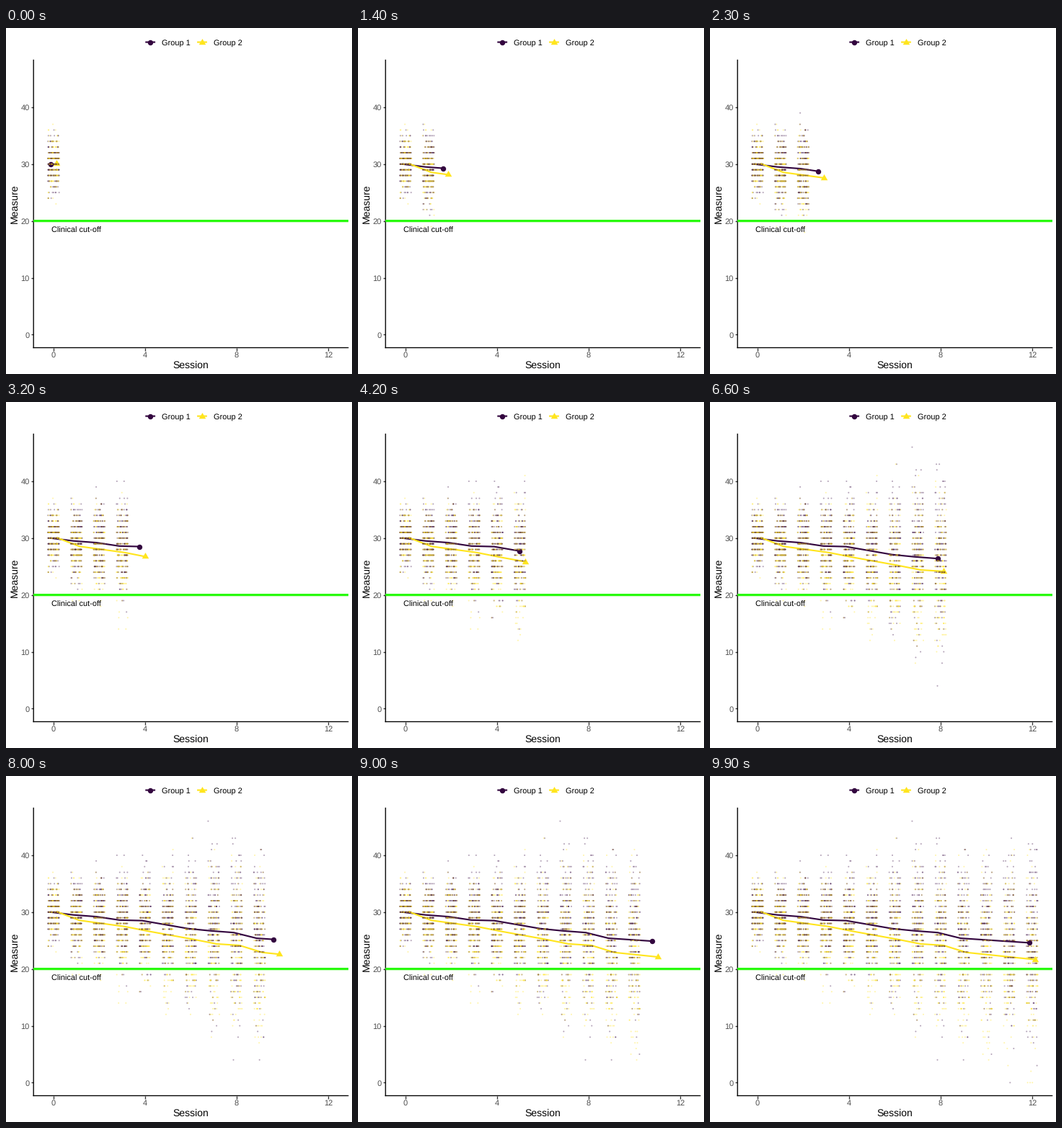
A matplotlib script that plays this animation: 480 by 480 pixels, repeating every 10000 ms.

```python
import matplotlib.pyplot as plt
import numpy as np
from matplotlib.animation import FuncAnimation
from matplotlib.lines import Line2D

SIZE, DPI = 480, 72
FRAMES, INTERVAL = 100, 100
LEFT, RIGHT, TOP, BOTTOM = 38.2, 474.6, 44.5, 443.5
XLIM, YLIM = (-0.875, 12.875), (-2.3, 48.3)
DODGE, JITTER = 0.125, 0.25
PER_GROUP = 200

PURPLE, YELLOW, GREEN, GREY = "#33063f", "#ffe51e", "#26fa06", "#4d4d4d"
COLORS = np.array([PURPLE, YELLOW])
TRIANGLE = [(0, 5.52), (-4.78, -2.76), (4.78, -2.76), (0, 5.52)]
MARKERS = [dict(marker="o", ms=7.4), dict(marker=TRIANGLE, ms=11.04)]

# Group means bend at these sessions and run straight in between
SESSIONS = np.arange(13)
BENDS = [0, 1, 2, 3, 4, 6, 7, 8, 9, 12]
MEANS = np.array([
    np.interp(SESSIONS, BENDS, [30, 29.5, 29.2, 28.6, 28.5, 27.1, 26.7, 26.4, 25.4, 24.6]),
    np.interp(SESSIONS, BENDS, [30.1, 28.55, 28, 27.45, 26.65, 25.2, 24.4, 24.15, 22.9, 21.65]),
])

plt.rcParams.update({"font.family": "Liberation Sans", "text.hinting": "none"})
fig = plt.figure(figsize=(SIZE / DPI, SIZE / DPI), dpi=DPI, facecolor="white")
ax = fig.add_axes([LEFT / SIZE, 1 - BOTTOM / SIZE,
                   (RIGHT - LEFT) / SIZE, (BOTTOM - TOP) / SIZE])
ax.set(xlim=XLIM, ylim=YLIM, xticks=range(0, 13, 4), yticks=range(0, 41, 10))
ax.spines[["top", "right"]].set_visible(False)
for side in ("left", "bottom"):
    ax.spines[side].set(linewidth=1.36, snap=False)
ax.tick_params(length=3.5, width=1.36, color="#333333",
               labelleft=False, labelbottom=False)


def label(x, y, text, size=11, color="black", ha="center", **kw):
    """Text at a pixel position, y being the baseline."""
    fig.text(x / SIZE, 1 - y / SIZE, text, fontsize=size, color=color,
             ha=ha, va="baseline", **kw)


def legend_key(x, group):
    y = 1 - 19.6 / SIZE
    color = COLORS[group]
    fig.add_artist(Line2D([(x - 6.9) / SIZE, (x + 6.9) / SIZE], [y, y],
                          color=color, lw=2.13, solid_capstyle="butt", snap=False))
    fig.add_artist(Line2D([x / SIZE], [y], color=color, mew=0, snap=False,
                          **MARKERS[group]))
    label(x + 15.7, 23.6, f"Group {group + 1}", ha="left")


def draw_scores(rng, k):
    """Jittered whole-number scores of session k, spreading like a random walk."""
    group = rng.permutation(np.repeat([0, 1], PER_GROUP))
    spread = np.hypot(2.4, 2 * np.sqrt(k))
    value = np.round(rng.normal(MEANS[group, k], spread)).clip(0, 46)
    x = k + rng.uniform(-JITTER, JITTER, group.size)
    return ax.scatter(x, value, s=4.2, c=COLORS[group], alpha=0.36,
                      linewidths=0, zorder=4, snap=False)


for v in ax.get_xticks():
    label(np.interp(v, XLIM, (LEFT, RIGHT)), 457, f"{v:.0f}", color=GREY)
for v in ax.get_yticks():
    label(32.6, np.interp(v, YLIM, (BOTTOM, TOP)) + 4.4, f"{v:.0f}",
          color=GREY, ha="right")
label(256.4, 472, "Session", size=14)
label(16, 244, "Measure", size=14, rotation=90, rotation_mode="anchor")
label(97.7, 284.3, "Clinical cut-off")
legend_key(200.2, 0)
legend_key(272, 1)

ax.axhline(20, color=GREEN, lw=3.2, zorder=6, snap=False)
lines = [ax.plot([], [], color=c, lw=2.13, solid_capstyle="butt", zorder=2)[0]
         for c in COLORS]
heads = [ax.plot([], [], color=c, mew=0, zorder=3, snap=False, **m)[0]
         for c, m in zip(COLORS, MARKERS)]
rng = np.random.default_rng(12)
clouds = [draw_scores(rng, k) for k in SESSIONS]

# Each session is reached exactly on a whole frame
KEYS = np.round(SESSIONS * (FRAMES - 1) / 12)


def update(i):
    t = np.interp(i, KEYS, SESSIONS)
    past = SESSIONS[SESSIONS < t]
    for g, (line, head) in enumerate(zip(lines, heads)):
        shift = DODGE * (2 * g - 1)
        now = np.interp(t, SESSIONS, MEANS[g])
        line.set_data(np.append(past, t) + shift, np.append(MEANS[g, past], now))
        head.set_data([t + shift], [now])
    for k, cloud in enumerate(clouds):
        cloud.set_visible(bool(k <= t))
    return lines + heads + clouds


anim = FuncAnimation(fig, update, frames=FRAMES, interval=INTERVAL,
                     repeat=True, repeat_delay=0)
plt.show()
```
